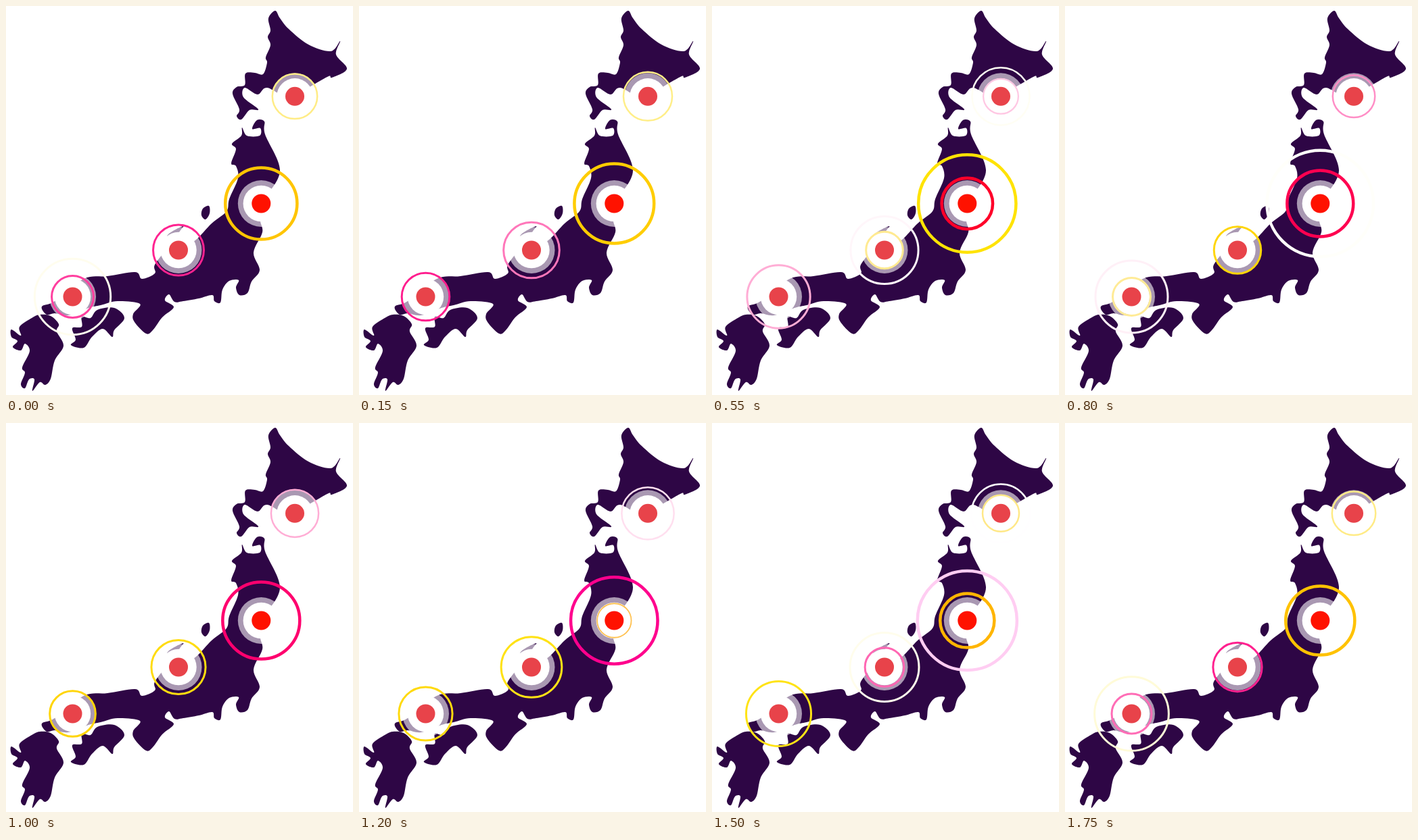
Write an HTML page that moves like this. It is 513x576 px and loops after 1800 ms.

```html
<!DOCTYPE html>
<html lang="en">
<head>
<meta charset="utf-8">
<title>Map pulses</title>
<style>
html, body { margin: 0; width: 100%; height: 100%; overflow: hidden; background: #fff; }
svg { display: block; width: 100vw; height: 100vh; }
</style>
</head>
<body>
<svg viewBox="0 0 513 576">
  <g id="land" fill="#2e0645"></g>
  <g id="discs"></g>
  <g id="rings" fill="none"></g>
</svg>
<script>
const LOOP = 1800, STEP = 50;

// Key points of each coast, joined by a smooth closed curve.
const coasts = {
  hokkaido: `398,7 405,18 418,34 447,57 480,67 494,52 488,72 504,93 482,106 477,104 452,118 420,136
    386,121 372,131 353,121 351,135 373,153 360,154 348,168 341,163 345,153 335,130 341,120 353,117
    354,100 368,99 380,101 386,84 384,76 391,58 387,46 391,36 388,18`,
  honshu: `349,180 356,192 375,192 376,181 364,182 371,169 382,171 383,190 405,243 384,285 376,315
    379,335 366,365 375,391 363,408 357,425 345,428 340,417 344,406 330,407 320,420 317,439 308,437
    305,428 285,433 262,437 249,438 241,427 235,436 248,446 231,461 217,480 207,485 190,468 188,456
    198,441 165,437 140,443 122,447 92,458 72,455 60,457 53,445 72,437 115,404 150,400 191,394 201,404
    220,396 220,383 240,355 239,339 262,326 256,338 275,350 304,322 326,304 330,286 343,255 340,237
    333,233 340,212 334,204 348,192`,
  shikoku: `98,477 112,475 112,460 125,462 135,450 160,447 175,462 160,480 157,490 143,478 127,490
    115,506 96,502 103,494`,
  kyushu: `50,457 66,459 78,471 75,482 85,503 72,525 66,552 58,561 50,557 39,570 42,553 34,553 28,566
    22,560 28,543 24,535 35,511 28,500 22,510 10,505 17,496 8,490 8,479 22,488 20,475 38,462`,
  sado: '291,300 300,296 301,307 295,316 289,310'
};

// curve [r, a, b] gives radius r + a*u - b*u*u; every site sends out a gold and a pink ring per loop.
const sites = [
  { x: 377.3, y: 292.5, dot: '#ff1200', curve: [24.2, 52.9, 10.2], width: 4.5,
    start: 1180, lead: 0, life: 1.46, rise: .02, strength: 1, fade: [.2, .37],
    hues: [['#ffa400', '#fff200'], ['#ff0000', '#ff00e0']] },
  { x: 255, y: 361.5, curve: [27.3, 31.5, 6.9], start: 550, life: 1.15 },
  { x: 98.5, y: 430.5, curve: [28, 29.5, 1.3], start: 800, life: 1.2 },
  { x: 427, y: 133.8, curve: [27, 22, 4.3], start: 1500, life: 1.05, width: 2.5, rise: .1, strength: .5 }
];
const common = {
  dot: '#e8434a', width: 3, lead: .1, rise: .2, strength: 1, fade: [.3, .6],
  hues: [['#ffcc00', '#ffee20'], ['#ff1088', '#ff409c']]
};

function setAll(el, attrs) {
  for (const name in attrs) el.setAttribute(name, attrs[name]);
}

function add(layer, tag, attrs) {
  const el = document.createElementNS('http://www.w3.org/2000/svg', tag);
  setAll(el, attrs);
  document.getElementById(layer).append(el);
  return el;
}

function smoothPath(text) {
  const pts = text.trim().split(/\s+/).map(p => p.split(',').map(Number));
  const at = i => pts[(i + pts.length) % pts.length];
  const handle = (p, from, to) => p.map((v, k) => (v + (to[k] - from[k]) / 6).toFixed(1));
  const curves = pts.map((p, i) => {
    const next = at(i + 1);
    return `C${handle(p, at(i - 1), next)} ${handle(next, at(i + 2), p)} ${next}`;
  });
  return `M${pts[0]}${curves.join('')}Z`;
}

const rgb = hex => [1, 3, 5].map(i => parseInt(hex.slice(i, i + 2), 16));
const mix = (a, b, k) => a.map((v, i) => v + (b[i] - v) * k);

// The hue drifts over the ring's life, while a tint lets it emerge from white and return to it.
function ringColour({ site, hue, fade }, p) {
  const tint = site.strength * Math.min(1, p / site.rise, ((1 - p) / fade) ** 2);
  const colour = mix([255, 255, 255], mix(...hue, p), tint);
  return `rgb(${colour.map(Math.round)})`;
}

for (const name in coasts) add('land', 'path', { d: smoothPath(coasts[name]) });

const rings = sites.flatMap(own => {
  const site = { ...common, ...own };
  const centre = { cx: site.x, cy: site.y };
  add('discs', 'circle', { ...centre, r: 34.5, fill: '#fff', 'fill-opacity': .59 });
  add('discs', 'circle', { ...centre, r: 26.7, fill: '#fff' });
  add('discs', 'circle', { ...centre, r: 14, fill: site.dot });
  return site.hues.map((pair, n) => ({
    site,
    hue: pair.map(rgb),
    fade: site.fade[n],
    start: site.start + n * LOOP / 2 - site.lead * 1000,
    el: add('rings', 'circle', centre)
  }));
});

function draw(time) {
  const t = Math.floor(time % LOOP / STEP) * STEP;
  for (const ring of rings) {
    const { lead, life, width, curve: [r, a, b] } = ring.site;
    const age = (t - ring.start + 2 * LOOP) % LOOP / 1000;
    const u = age - lead;
    setAll(ring.el, {
      visibility: age < life ? 'visible' : 'hidden',
      r: Math.max(0, r + a * u - b * u * u),
      stroke: ringColour(ring, Math.min(1, age / life)),
      'stroke-width': Math.min(width, 1.5 + 15 * age)
    });
  }
}

const began = performance.now();
function tick() {
  draw(performance.now() - began);
  requestAnimationFrame(tick);
}
draw(0);
requestAnimationFrame(tick);
</script>
</body>
</html>
```
